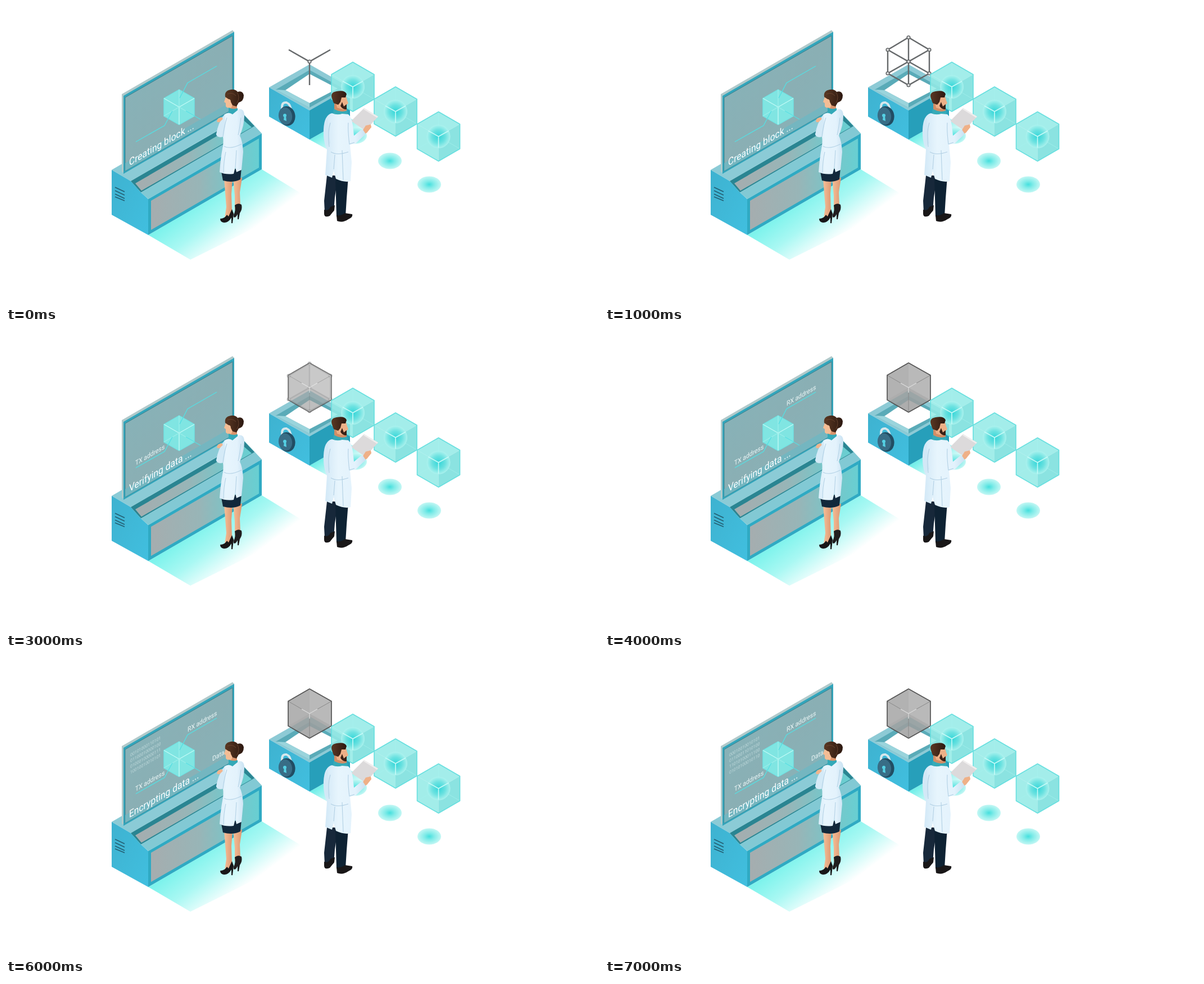
These frames come from a looping animation (1055x531 px, 8000 ms). An HTML page:

```html
<!DOCTYPE html>
<html lang="en">
<head>
<meta charset="utf-8">
<title>Creating a block</title>
<style>
html, body { margin: 0; width: 100%; height: 100%; overflow: hidden; background: #fff; }
svg { display: block; width: 100vw; height: 100vh; }
text { font-family: Roboto, Arial, sans-serif; fill: #fff; white-space: pre; }
.big { font-size: 18px; }
.label { font-size: 12px; fill: #edf7f7; }
.bits { font-size: 8px; fill: #bfd9db; }
</style>
</head>
<body>
<svg viewBox="0 0 1055 531">
<defs>
  <linearGradient id="floor" gradientUnits="userSpaceOnUse" x1="345" y1="345" x2="404" y2="424">
    <stop offset="0" stop-color="#7df3ec"/><stop offset=".45" stop-color="#a9f8f3"/><stop offset="1" stop-color="#fff"/>
  </linearGradient>
  <linearGradient id="floor2" gradientUnits="userSpaceOnUse" x1="575" y1="215" x2="602" y2="254">
    <stop offset="0" stop-color="#6eeee8"/><stop offset="1" stop-color="#fff"/>
  </linearGradient>
  <linearGradient id="screen" x1="0" y1="0" x2="1" y2="1">
    <stop offset="0" stop-color="#86b4ba"/><stop offset=".5" stop-color="#8aafb4"/><stop offset="1" stop-color="#86b5bb"/>
  </linearGradient>
  <linearGradient id="panel">
    <stop offset="0" stop-color="#a5adaf"/><stop offset=".45" stop-color="#98b5b7"/>
    <stop offset=".75" stop-color="#79c5c8"/><stop offset="1" stop-color="#68cfd2"/>
  </linearGradient>
  <linearGradient id="side" x1="0" y1="0" x2="1" y2="1">
    <stop offset="0" stop-color="#3eb2d0"/><stop offset="1" stop-color="#41bfdf"/>
  </linearGradient>
  <linearGradient id="coat">
    <stop offset="0" stop-color="#d0e7f6"/><stop offset=".35" stop-color="#e7f5fd"/>
    <stop offset=".75" stop-color="#e3f2fc"/><stop offset="1" stop-color="#c9e2f2"/>
  </linearGradient>
  <linearGradient id="skin"><stop offset="0" stop-color="#f5bf98"/><stop offset="1" stop-color="#dd9872"/></linearGradient>
  <linearGradient id="hair"><stop offset="0" stop-color="#5b3823"/><stop offset="1" stop-color="#2c1810"/></linearGradient>
  <radialGradient id="core">
    <stop offset="0" stop-color="#21d3d6"/><stop offset=".55" stop-color="#62e0df"/><stop offset="1" stop-color="#aff3ef"/>
  </radialGradient>
  <radialGradient id="spot">
    <stop offset="0" stop-color="#45e0de"/><stop offset=".4" stop-color="#80ebe8"/><stop offset="1" stop-color="#c3f7f4"/>
  </radialGradient>
  <g id="cube" stroke-linejoin="round">
    <path d="M0-44 38-22 0 0-38-22Z" fill="#8feae6" fill-opacity=".82"/>
    <path d="M-38-22 0 0V44L-38 22Z" fill="#93ebe6" fill-opacity=".86"/>
    <path d="M38-22 0 0V44L38 22Z" fill="#79dfdd" fill-opacity=".86"/>
    <path d="M0-44V0L-38 22M0 0 38 22" fill="none" stroke="#a7f2ee" opacity=".65"/>
    <path d="M0-44 38-22V22L0 44-38 22V-22Z" fill="none" stroke="#66dfdf" stroke-width="1.6"/>
    <circle r="21" fill="url(#core)" opacity=".85"/>
    <path d="M-18-10 0 0 18-10M0 0V20" fill="none" stroke="#c8faf7" stroke-width="1.6"/>
  </g>
  <ellipse id="glow" rx="21" ry="14.5" fill="url(#spot)"/>
</defs>

<path d="M253 408 455 291 543 345 328 452Z" fill="url(#floor)"/>

<!-- console -->
<path d="M188 292 386 177 424 194 222 312Z" fill="#8bcbd6"/>
<path d="M188 292 222 312 240 332 253 344V408L188 372Z" fill="url(#side)"/>
<path d="M222 312 424 194 455 227 253 344 240 332Z" fill="#82c9d4"/>
<path d="M222 312 424 195 442 214 240 332Z" fill="#2a8592"/>
<path d="M230 316 423 204 437 216 241 329Z" fill="url(#panel)"/>
<path d="M253 344 455 227V291L253 408Z" fill="#2faac3"/>
<path d="M258 347 450 236V288L258 399Z" fill="url(#panel)"/>
<path d="M194 323 211 331M194 329 211 337M194 335 211 343M194 340 211 347" stroke="#245f73" stroke-width="1.7"/>

<!-- screen -->
<path d="M206 157 403 43 406 46 210 161V298L206 295Z" fill="#b1c9ca"/>
<path d="M209 160 406 46V185L209 299Z" fill="#32a5bb"/>
<path d="M212 163 403 53V184L212 294Z" fill="url(#screen)" stroke="#3d7f8b"/>
<path d="M212 280 403 169V184L212 294Z" fill="#70b8c3" opacity=".8"/>
<g fill="none" stroke="#70e5e5" stroke-width="1.4">
  <path d="M281 164.500 308 149 335 164.500V196L308 211.500 281 196Z" fill="#80e5e2"/>
  <path d="M281 164.500 308 180 335 164.500M308 180V211" stroke="#c0faf6"/>
  <path d="M308 149V180L281 196M308 180 335 196" stroke="#a4f1ed" opacity=".7"/>
  <path d="M309 164 323 137 375 107M296 187 282 213 231 242M320 187 346 202" stroke="#56dee2"/>
</g>
<g id="words"></g>

<!-- locked box -->
<path d="M540 238 610 198 661 233 576 258Z" fill="url(#floor2)"/>
<path d="M468 145 540 104 612 145 540 186Z" fill="#8dcad5"/>
<path d="M480 149 540 114 600 147 540 181Z" fill="#5aabb8"/>
<path d="M497 150 540 121 590 147 540 173Z" fill="#fff"/>
<path d="M480 149 497 150 540 173V181Z" fill="#9ad4dc"/>
<path d="M468 145 540 186V238L468 197Z" fill="url(#side)"/>
<path d="M540 186 612 145V197L540 238Z" fill="#279fba"/>
<path d="M491 187V180Q491 171 499 172 507 175 507 188" fill="none" stroke="#d7e7ec" stroke-width="4"/>
<ellipse cx="500" cy="196" rx="14.500" ry="17.500" fill="#214d63" transform="rotate(-10 500 196)"/>
<ellipse cx="497" cy="196" rx="12" ry="15.500" fill="#386d86" transform="rotate(-10 497 196)"/>
<g fill="#55d1e4"><circle cx="496" cy="195" r="3"/><path d="M495 196H498L499 205 494 203Z"/></g>

<!-- new block -->
<g data-on="0 2" fill="none" stroke="#65686a" stroke-width="2.4">
  <path d="M503 78 540 99 577 78M540 99V141"/>
  <circle cx="540" cy="99" r="2.800" fill="#ddd" stroke-width="1.6"/>
</g>
<g id="frame" data-on="1 3" fill="none" stroke="#65686a" stroke-width="2.4">
  <path d="M540 56 577 78V120L540 141 503 120V78ZM540 56V99L503 120M540 99 577 120"/>
</g>
<g id="solid" data-on="3 7" stroke-linejoin="round">
  <path d="M540 55 579 77V121L540 143 502 121V77Z" fill="#a6a6a6" fill-opacity=".76"/>
  <path d="M540 55V99L502 121V77Z" fill="#aaa" fill-opacity=".5"/>
  <path d="M540 55 579 77V121L540 99Z" fill="#b8b8b8" fill-opacity=".5"/>
  <path d="M502 121 540 99 579 121 540 143Z" fill="#929292" fill-opacity=".35"/>
  <path d="M502 77 540 99 579 77M540 99V143" fill="none" stroke="#898989"/>
  <path d="M526 91 540 99 554 91M540 99V108" fill="none" stroke="#e2e2e2" stroke-width="1.3"/>
  <path d="M540 55 579 77V121L540 143 502 121V77Z" fill="none" stroke="#555" stroke-width="1.7"/>
</g>

<!-- chain -->
<use href="#glow" x="621" y="231"/>
<use href="#glow" x="683" y="276"/>
<use href="#glow" x="753" y="318"/>
<use href="#cube" x="617" y="144"/>
<use href="#cube" x="693" y="188"/>
<use href="#cube" x="769.500" y="232.500"/>

<!-- woman -->
<path d="M388 308H403L401 335 402 365 396 380 389 378 392 358Z" fill="url(#skin)"/>
<path d="M404 306H420L416 332 417 356 412 366 407 362 407 338Z" fill="url(#skin)"/>
<path d="M381 379Q389 379 393 372L396 375 402 362 405 370 403 387 401 387V377Q396 386 388 386 381 385 381 379Z" fill="#191718"/>
<path d="M405 372Q409 365 407 355 413 350 419 354 421 362 416 369L414 380H412V371Q408 379 405 376Z" fill="#211e1f"/>
<path d="M383 295 419 288 417 309Q404 316 386 311Z" fill="#12283b"/>
<path d="M397 174H411V190H397Z" fill="#d8956d"/>
<path d="M391 162Q389 168 388 171L391 173 391 179Q394 183 401 181L405 171 400 160Z" fill="#f4bd95"/>
<path d="M390 162Q388 151 400 149 408 148 412 153 421 150 423 159 423 170 414 172L410 179 403 177 400 171Q400 166 396 166Z" fill="url(#hair)"/>
<path d="M411 154Q417 162 411 173M394 157Q403 153 409 160" fill="none" stroke="#795039" opacity=".7"/>
<path d="M396 181Q404 185 412 182L413 194H396Z" fill="#33a9b8"/>
<path d="M389 193Q396 188 403 193L414 184Q424 182 424 196 424 212 416 231 421 241 422 260L419 292 410 296 408 287 405 299Q391 301 380 296 382 268 386 249 387 240 386 233 376 235 374 229 379 207 389 193Z" fill="url(#coat)"/>
<path d="M389 193Q377 208 374 229 378 236 387 232L390 214" fill="#d4eaf7"/>
<path d="M393 199Q388 214 386 233M418 199Q416 217 413 230M388 250Q399 256 419 246M408 288 410 257M391 260Q387 277 387 297" fill="none" stroke="#b4d2e6" stroke-width="1.1"/>
<path d="M376 207Q374 203 378 200L383 198 386 201 380 207Z" fill="#f1b58d"/>

<!-- man -->
<path d="M571 302H591L585 341 583 366 567 368 566 347Z" fill="#17283a"/>
<path d="M586 304H609L606 343 604 375H588L587 341Z" fill="#0e2233"/>
<path d="M566 363Q574 366 577 358L585 355 584 364 576 374Q566 378 566 370Z" fill="#191718"/>
<path d="M588 373Q597 374 603 369L616 371Q618 376 609 380 599 387 589 383Z" fill="#191718"/>
<path d="M584 174H605L607 193H584Z" fill="#d28d65"/>
<path d="M585 161H605L607 168 609 173 606 176V183Q598 185 589 181Z" fill="#edb087"/>
<path d="M580 165Q576 154 588 152 603 149 606 157L604 163H597L595 171 591 176 583 173Z" fill="url(#hair)"/>
<path d="M598 171 601 179 606 175V184Q599 185 595 178Z" fill="#3a2117"/>
<path d="M583 183Q596 191 607 186L609 198H581Z" fill="#36aab7"/>
<path d="M637 182 662 197 639 222 614 205Z" fill="#dcdadb"/>
<path d="M637 182 662 197 660 199 636 184Z" fill="#f0eeee"/>
<path d="M635 221 640 213 649 211 650 216 642 226 635 229Z" fill="#efb087"/>
<path d="M580 191Q589 195 598 192L609 193Q615 198 617 213L619 231 634 219 640 228 622 245 612 247 615 278 613 312Q602 315 587 308L583 294 580 306 568 301 571 256Q564 241 565 220 566 194 580 191Z" fill="url(#coat)"/>
<path d="M572 197Q565 212 566 230L571 251 577 244 574 222Z" fill="#d2e8f6"/>
<path d="M577 208Q572 224 575 251M609 208Q608 224 611 246L620 243M578 260Q589 267 609 260M583 291 585 265M598 257 600 310" fill="none" stroke="#b2d0e4" stroke-width="1.1"/>
</svg>
<script>
const $ = id => document.getElementById(id);

// Text lying on the isometric screen; shown from step a up to and including b
const write = (type, x, y, a, b, text) =>
  `<text class="${type}" data-on="${a} ${b}" transform="matrix(.866 -.5 0 1 ${x} ${y})">${text}</text>`;
const bits = (step, rows) =>
  rows.map((row, i) => write("bits", 221, 176 + i * 10.3, step, step, row)).join("");

$("words").innerHTML =
  write("big", 219, 285, 0, 2, "Creating block ...") +
  write("big", 219, 285, 3, 5, "Verifying data ...") +
  write("big", 219, 285, 6, 7, "Encrypting data ...") +
  write("label", 230, 238, 3, 7, "TX address") +
  write("label", 323, 132, 4, 7, "RX address") +
  write("label", 367, 184, 5, 7, "Data") +
  bits(6, ["00101000110101", "01100010000100", "01000100000111", "10010010010101"]) +
  bits(7, ["00010010010101", "01100011010100", "11010100011100", "01010100010110"]);

const nodes = [[540, 56], [577, 78], [577, 120], [540, 141], [503, 120], [503, 78], [540, 99]];
$("frame").innerHTML += nodes.map(([x, y]) =>
  `<circle cx="${x}" cy="${y}" r="2.800" fill="#ddd" stroke-width="1.6"/>`).join("");

const timed = [...document.querySelectorAll("[data-on]")].map(el => [el, ...el.dataset.on.split(" ")]);
const start = performance.now();

function draw() {
  const step = Math.floor((performance.now() - start) / 1000) % 8;
  for (const [el, a, b] of timed) el.style.display = step >= a && step <= b ? "" : "none";
  // The wire frame dissolves into the solid block
  $("frame").style.opacity = step === 3 ? .35 : 1;
  $("solid").style.opacity = step === 3 ? .78 : 1;
  requestAnimationFrame(draw);
}
draw();
</script>
</body>
</html>
```
